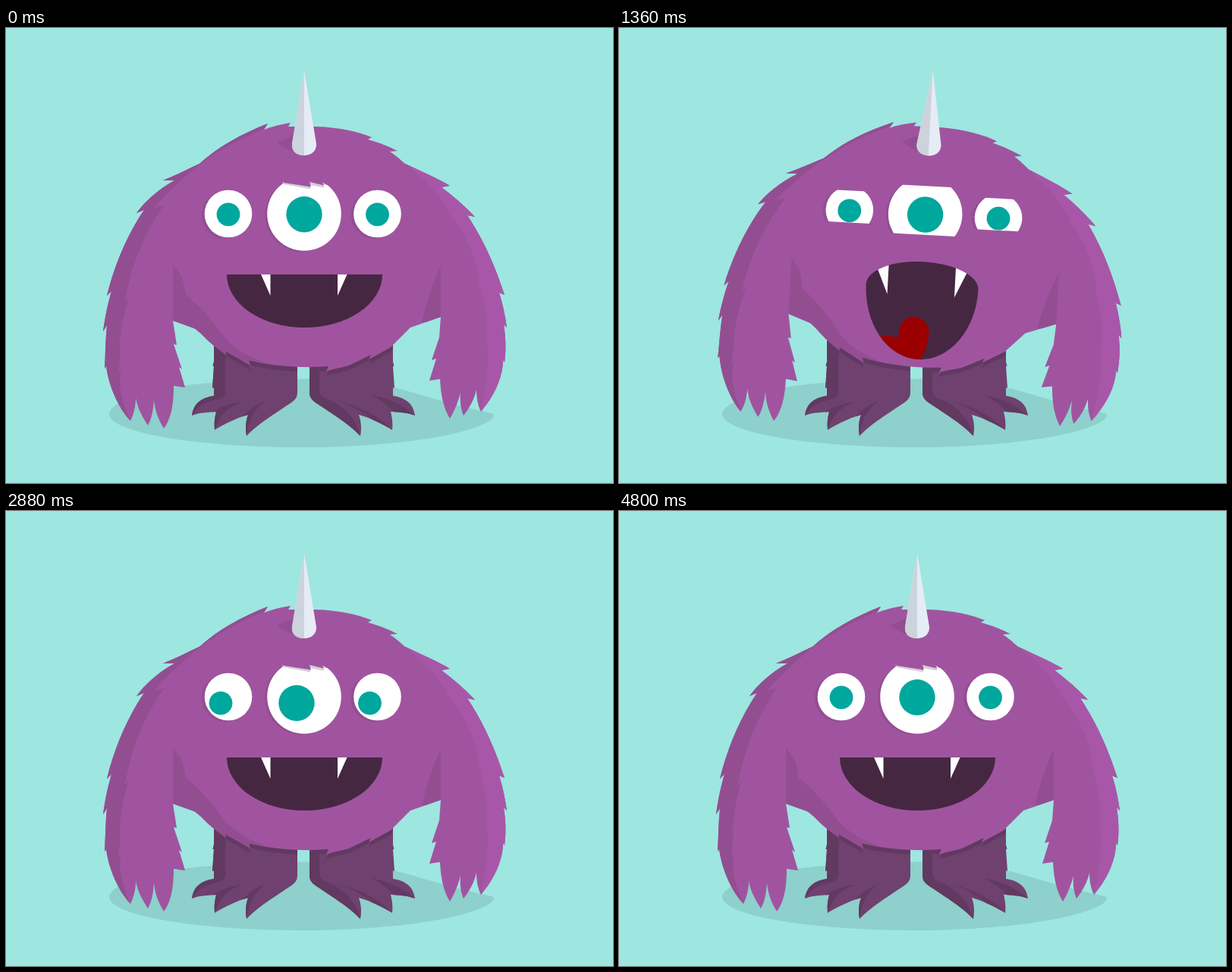
Write an HTML page that moves like this. It is 800 by 600 pixels and loops after 4840 ms.

```html
<!DOCTYPE html>
<html lang="en">
<head>
<meta charset="utf-8">
<title>Purple monster</title>
<style>
  html, body { margin: 0; width: 100%; height: 100%; overflow: hidden; background: #9ee6e0; }
  svg { display: block; width: 100vw; height: 100vh; }
  .fur { fill: #a0549f; }
  .shade { fill: #934e92; }
  .glow { fill: #a857a8; }
  .leg { fill: #6f416f; }
  .legShade { fill: #613961; }
</style>
</head>
<body>
<svg viewBox="0 0 800 600">
  <defs>
    <path id="torso" d="M377 130L372 130 375 125C362 127 350 130 340 134L345 126C310 140 280 156 255 179L228 192
      C205 230 195 300 206 381L220 386 248 396C255 400 262 409 274 419L290 431 289 426 322 445 320 438
      C350 446 390 449 425 446L422 453C432 449 442 448 452 445L481 431 478 437 509 420 506 422
      C514 414 524 404 533 395L573 381 590 378C610 320 600 250 560 196L526 179C520 174 515 169 506 163L516 162
      C504 156 492 151 477 147L482 144C465 137 440 131 409 130Z"/>
    <path id="armL" d="M255 179C240 186 222 195 207 201L222 201C200 213 182 230 172 244L182 240
      C160 272 143 312 133 353L139 347C133 368 130 385 128 400L133 392C131 412 131 430 130 449L132 446
      C135 470 147 500 164 518C168 510 171 500 171 488C173 500 178 510 187 524C192 515 194 505 195 490
      C196 503 200 515 208 528C218 515 221 495 221 472L236 474 228 447 232 450 221 417 225 418 220 386V312
      C235 270 250 220 255 179Z"/>
    <path id="armR" d="M526 179C550 190 570 199 585 208L574 210C590 222 605 235 618 249L608 247
      C630 280 645 315 657 352L650 349C655 365 658 380 660 395L656 391C659 410 659 425 657 441L655 438
      C655 462 642 487 626 506C622 498 620 488 620 477C617 490 611 501 603 511C599 502 598 492 599 481
      C596 493 591 505 585 515C576 500 573 483 572 463L558 465 567 436 561 438 571 408 573 381V312
      C560 270 540 220 526 179Z"/>
    <path id="leg" d="M274 400V440L272.500 446 274 446 272 475 274 474V485C256 488 247 496 245 511
      C255 507 265 507 277 506C275 514 274 522 275 530C288 522 302 515 319 510C316 519 315 528 317 538
      C332 522 354 509 376 494Q384 489 384 481V400Z"/>
    <clipPath id="torsoClip"><use href="#torso"/></clipPath>
    <clipPath id="armLClip"><use href="#armL"/></clipPath>
    <clipPath id="armRClip"><use href="#armR"/></clipPath>
    <clipPath id="legsClip">
      <use href="#leg"/><use href="#leg" transform="matrix(-1 0 0 1 784 0)"/>
    </clipPath>
    <clipPath id="mouthClip"><path class="lips"/></clipPath>
    <clipPath id="gumClip"><path id="gum"/></clipPath>
  </defs>

  <path fill="#8ed0cb" d="M136 509C138 490 200 472 272 468C350 463 430 461 470 464C520 474 580 496 640 508
    C646 510 642 515 634 520C590 543 480 553 391 553C250 553 136 533 136 509Z"/>

  <use href="#leg" class="leg"/>
  <use href="#leg" class="leg" transform="matrix(-1 0 0 1 784 0)"/>
  <g clip-path="url(#legsClip)">
    <g class="legShade">
      <path d="M270 400H289V482Q287 488 278 490C262 494 252 499 245 511L240 480Z"/>
      <path d="M312 493C294 498 282 509 275 530L272 506Q290 495 312 493Z"/>
      <path d="M343 492C328 501 320 516 317 538L310 515Q324 497 343 492Z"/>
      <path d="M396 400H413V478Q413 485 422 489C446 498 461 515 467 538L396 494Z"/>
      <path d="M437 492C466 499 490 510 509 530L485 518Q463 500 437 492Z"/>
      <path d="M482 484C505 489 525 498 539 511L512 507Q500 494 482 484Z"/>
    </g>
    <g class="body"><use href="#torso" class="legShade" y="6"/></g>
  </g>

  <g class="body">
    <use href="#torso" class="fur"/>
    <g clip-path="url(#torsoClip)" class="shade">
      <path d="M350 120L342 132C310 145 282 160 258 178L220 222 180 200 280 130Z"/>
      <path d="M220 312C226 320 232 326 233 332L237 352C262 372 275 390 290 410C305 425 320 434 342 441L320 460 210 400Z"/>
      <path d="M574 312C562 335 555 360 548 388L600 388V312Z"/>
      <path d="M357 151L380 141V163Q366 159 357 151Z"/>
    </g>
    <g id="swingL">
      <use href="#armL" class="fur"/>
      <path class="shade" clip-path="url(#armLClip)" d="M258 177C235 197 215 215 195 237L208 234
        C184 268 164 314 157 362L163 352C155 378 151 398 151 412L149 407C152 428 150 441 148 456L152 452
        C147 470 154 496 164 518L100 520V180Z"/>
    </g>
    <g id="swingR">
      <use href="#armR" class="fur"/>
      <path class="glow" clip-path="url(#armRClip)" d="M526 179C550 196 568 217 584 241L581 241
        C606 270 619 300 624 333L621 330C630 355 634 378 635 401L632 398C638 430 635 465 626 506L700 500V170Z"/>
    </g>
    <path fill="#e6ecf6" d="M393 56L409 153C410 173 376 173 377 153Z"/>
    <path fill="#ccd3dc" d="M393 56V168C382 168 376 162 377 153Z"/>
    <g id="eyes"></g>
    <g id="fringe">
      <path fill="#d2ced8" d="M364 203L366 206 401 212.500 401 207 419 210.500 419 206 422 207V200Z"/>
      <path class="fur" d="M352 193L366 204 402 209.500 400 203 419 207.500 417 203.500 423 207 434 193Z"/>
    </g>
    <path class="lips" fill="#462742"/>
    <g clip-path="url(#mouthClip)"><path id="tongue" fill="#9b0000"/></g>
    <path clip-path="url(#gumClip)" fill="#fff" d="M329 309H348.500V353ZM437 309H456.700L437 353Z"/>
  </g>
</svg>

<script>
const LOOP = 4840, STEP = 40;
const $ = id => document.getElementById(id);

// Lids: top and bottom of the middle eye, then of the side eyes
const OPEN = [190, 300, 210, 280], HALF = [208, 272.5, 219.4, 261.5],
      SQUINT = [224, 247.5, 234.5, 241.5], NEAR = [227, 252, 237.5, 245], SHUT = [241, 241, 241, 241];
// Mouth: centre x, half width, corner y, rise, drop
const GRIN = [393.5, 102.5, 325, 0, 70], THIN = [393.5, 102.5, 325, 0, 7.5],
      WIDE = [394, 74, 341, 33, 96], ROUND = [395, 77.3, 352, 43, 53.5];
const CURLED = "M320 408L367 408.5C364 392 374 381 385 381C398 381 407 391 406 404C405 418 402 428 395 442H320Z";
const FLAT = "M320 396L351 395.5C357 386 367 381.5 379 381.5C398 381.5 411 391 411 405C411 418 402 428 395 442H320Z";

const blink = t => [[t, OPEN], [t + 40, NEAR], [t + 80, SHUT]];
const tracks = {
  turn: [[560, [0]], [800, [3.25]], [1080, [3.03]], [2320, [3.03]], [2600, [-.2]], [2840, [0]]],
  swing: [[560, [0]], [640, [.6]], [800, [-1.3]], [960, [.3]], [1080, [0]],
          [2320, [0]], [2560, [1.2]], [2720, [-.4]], [2880, [0]]],
  lids: [[560, OPEN], [720, SQUINT], [1120, SQUINT], [1280, HALF], [2320, HALF], [2520, OPEN],
         ...blink(3520), [3640, SHUT], [3680, OPEN],
         ...blink(4080), [4200, NEAR], [4240, OPEN],
         ...blink(4640), [4760, NEAR], [4800, OPEN]],
  look: [[560, [0, 0]], [720, [23.7, 1]], [1120, [23.7, 1]], [1280, [0, 0]], [1520, [0, 0]], [1680, [22, 0]],
         [1880, [22, 0]], [2000, [0, 0]], [2320, [0, 0]], [2520, [-10, 7.5]], [3600, [-10, 7.5]],
         [3640, [-10, 5]], [4680, [-10, 5]], [4720, [0, 0]]],
  mouth: [[560, GRIN], [720, THIN], [1120, THIN], [1360, WIDE], [2280, WIDE], [2320, ROUND],
          [2360, ROUND], [2560, GRIN]],
  tongue: [[1120, [60]], [1360, [0]], [2360, [0]], [2480, [60]]]
};

function sample(keys, t) {
  const next = keys.findIndex(k => k[0] > t);
  if (next < 0) return keys[keys.length - 1][1];
  if (next === 0) return keys[0][1];
  const [t0, from] = keys[next - 1], [t1, to] = keys[next];
  const u = (t - t0) / (t1 - t0), ease = u * u * (3 - 2 * u);
  return from.map((v, i) => v + (to[i] - v) * ease);
}

// Eyes: centre x, radius, pupil radius, shadow offset, index of the lid pair
const eyes = [[293, 31.3, 15.4, -4, 2], [393, 48.8, 23.7, -3, 0], [489.5, 31.3, 15.4, -4, 2]];
$("eyes").innerHTML = eyes.map(([x, r, pupil, shift], i) => `
  <clipPath id="lid${i}"><rect x="${x - 60}" width="120"/></clipPath>
  <clipPath id="ball${i}"><circle cx="${x}" cy="245" r="${r}"/></clipPath>
  <g clip-path="url(#lid${i})">
    <circle class="shade" cx="${x + shift}" cy="246.500" r="${r}"/>
    <circle fill="#fff" cx="${x}" cy="245" r="${r}"/>
    <g clip-path="url(#ball${i})"><circle class="pupil" fill="#00a79d" cx="${x}" cy="245.800" r="${pupil}"/></g>
  </g>`).join("");
const lidRects = eyes.map((_, i) => $("lid" + i).firstElementChild);
const pupils = document.querySelectorAll(".pupil");
const bodies = document.querySelectorAll(".body");
const lips = document.querySelectorAll(".lips");

function draw(t) {
  const [turn] = sample(tracks.turn, t), [swing] = sample(tracks.swing, t);
  bodies.forEach(b => b.setAttribute("transform", `rotate(${turn} 393 447)`));
  $("swingL").setAttribute("transform", `rotate(${swing} 205 260)`);
  $("swingR").setAttribute("transform", `rotate(${swing} 590 260)`);

  const lids = sample(tracks.lids, t), look = sample(tracks.look, t);
  lidRects.forEach((rect, i) => {
    const k = eyes[i][4];
    rect.setAttribute("y", lids[k]);
    rect.setAttribute("height", Math.max(0, lids[k + 1] - lids[k]));
  });
  pupils.forEach(p => p.setAttribute("transform", `translate(${look})`));
  $("fringe").style.display = lids[0] < 204 ? "" : "none";

  const [x, w, y, rise, drop] = sample(tracks.mouth, t);
  const upper = `M${x - w} ${y}A${w} ${rise} 0 0 1 ${x + w} ${y}`;
  lips.forEach(l => l.setAttribute("d", `${upper}A${w} ${drop} 0 0 1 ${x - w} ${y}Z`));
  $("gum").setAttribute("d", `${upper}V500H${x - w}Z`);
  $("tongue").setAttribute("d", t < 2320 ? CURLED : FLAT);
  $("tongue").setAttribute("transform", `translate(0 ${sample(tracks.tongue, t)[0]})`);
}

const start = performance.now();
function frame() {
  const t = (performance.now() - start) % LOOP;
  draw(Math.floor(t / STEP) * STEP);
  requestAnimationFrame(frame);
}
frame();
</script>
</body>
</html>
```
